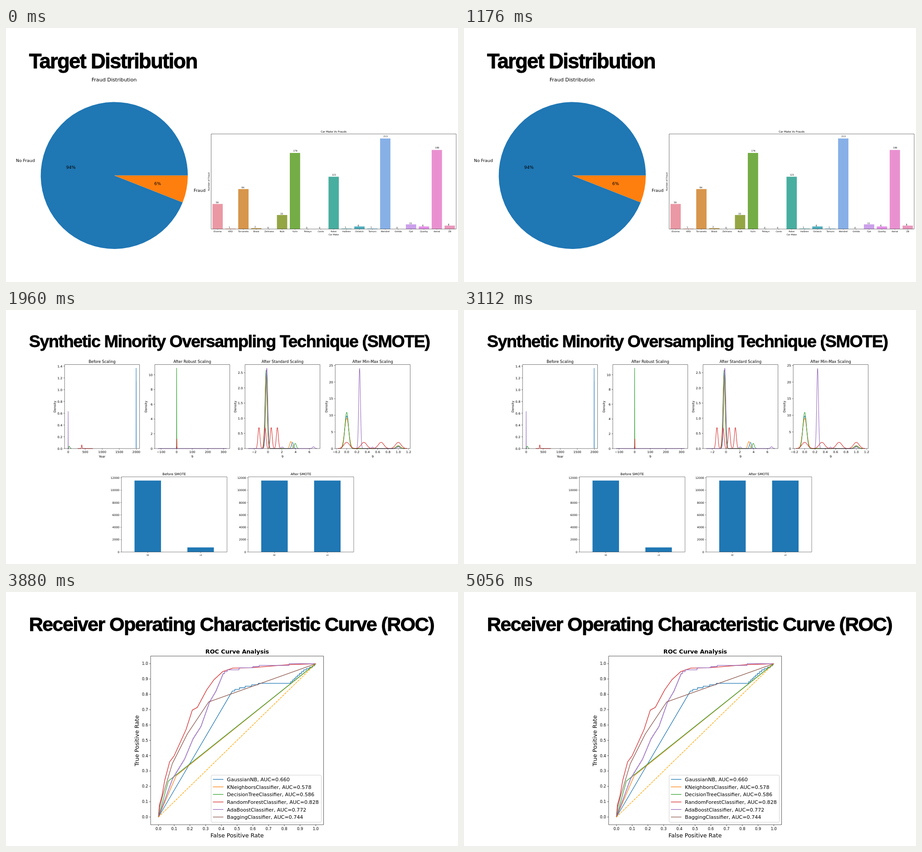
An HTML page with a canvas that plays this animation: 997x561 px, repeating every 5840 ms.

```html
<!DOCTYPE html>
<html lang="en">
<head>
<meta charset="utf-8">
<title>Fraud model slides</title>
<style>
html, body { margin: 0; width: 100%; height: 100%; overflow: hidden; background: #fff; }
canvas { display: block; }
</style>
</head>
<body>
<canvas id="stage" width="997" height="561"></canvas>
<script>
const ctx = document.getElementById('stage').getContext('2d');
const [BLUE, ORANGE, GREEN, RED, PURPLE, BROWN] =
  ['#1f77b4', '#ff7f0e', '#2ca02c', '#d62728', '#9467bd', '#8c564b'];

// y is the middle of the capitals
function text(str, x, y, size, { align = 'center', weight = '', turned = false } = {}) {
  ctx.save();
  ctx.translate(x, y);
  if (turned) ctx.rotate(-Math.PI / 2);
  ctx.font = `${weight} ${size}px "DejaVu Sans", sans-serif`;
  ctx.textAlign = align;
  ctx.fillStyle = '#000';
  ctx.fillText(str, 0, size * 0.365);
  ctx.restore();
}

function heading(str, size, baseline) {
  ctx.font = `bold ${size}px "Liberation Sans", Arial, sans-serif`;
  ctx.letterSpacing = `${-0.038 * size}px`;
  ctx.textAlign = 'left';
  ctx.fillStyle = ctx.strokeStyle = '#000';
  ctx.lineWidth = size * 0.02;
  ctx.lineJoin = 'round';
  ctx.fillText(str, 50.7, baseline);
  ctx.strokeText(str, 50.7, baseline);
  ctx.letterSpacing = '0px';
}

function line(points, color, width) {
  ctx.beginPath();
  for (const [x, y] of points) ctx.lineTo(x, y);
  ctx.strokeStyle = color;
  ctx.lineWidth = width;
  ctx.lineJoin = 'round';
  ctx.stroke();
}

function rect(x, y, w, h, color) {
  ctx.fillStyle = color;
  ctx.fillRect(x, y, w, h);
}

function frame([x0, y0, x1, y1], width) {
  ctx.strokeStyle = '#000';
  ctx.lineWidth = width;
  ctx.strokeRect(x0, y0, x1 - x0, y1 - y0);
}

const range = (from, step, count) => Array.from({ length: count }, (_, i) => from + i * step);
const label = (v, digits) => v.toFixed(digits).replace(/^-/, '\u2212');

function axes({ box, size, x, y, xTicks = [], yTicks, xDigits = 0, yDigits = 0 }) {
  const [left, , , bottom] = box, tick = size * 0.35, width = size * 0.08;
  frame(box, width);
  for (const v of xTicks) {
    line([[x(v), bottom], [x(v), bottom + tick]], '#000', width);
    text(label(v, xDigits), x(v), bottom + size * 1.12, size);
  }
  for (const v of yTicks) {
    line([[left - tick, y(v)], [left, y(v)]], '#000', width);
    text(label(v, yDigits), left - size * 0.7, y(v), size, { align: 'right' });
  }
}

// ---- Slide 1: class balance ----

function pie() {
  const cx = 238.8, cy = 325.7, r = 162.2, split = 0.0599 * 2 * Math.PI;
  const slices = [
    [split, 2 * Math.PI, BLUE, 'No Fraud', '94%', 'right'],
    [0, split, ORANGE, 'Fraud', '6%', 'left'],
  ];
  text('Fraud Distribution', 238.5, 113.5, 11.15);
  for (const [from, to, color, name, share, align] of slices) {
    const mid = (from + to) / 2;
    const at = d => [cx + r * d * Math.cos(mid), cy + r * d * Math.sin(mid)];
    ctx.beginPath();
    ctx.moveTo(cx, cy);
    ctx.arc(cx, cy, r, from, to);
    ctx.fillStyle = color;
    ctx.fill();
    text(name, ...at(1.1), 9.3, { align });
    text(share, ...at(0.6), 9.3);
  }
}

// Evenly bright hue in CIE LUV, at 90% of the largest chroma, then muted
function hueColor(turn) {
  const L = 70, angle = turn * 359 * Math.PI / 180, Y = ((L + 16) / 116) ** 3;
  const linear = chroma => {
    const u = chroma * Math.cos(angle) / (13 * L) + 0.19783;
    const v = chroma * Math.sin(angle) / (13 * L) + 0.46832;
    const X = Y * 9 * u / (4 * v), Z = Y * (12 - 3 * u - 20 * v) / (4 * v);
    return [
      3.2406 * X - 1.5372 * Y - 0.4986 * Z,
      -0.9689 * X + 1.8758 * Y + 0.0415 * Z,
      0.0557 * X - 0.204 * Y + 1.057 * Z,
    ];
  };
  let chroma = 0;
  while (linear(chroma).every(c => c >= 0 && c <= 1)) chroma += 0.5;
  const rgb = linear(chroma * 0.9).map(c => c <= 0.0031 ? 12.92 * c : 1.055 * c ** (1 / 2.4) - 0.055);
  const mid = (Math.max(...rgb) + Math.min(...rgb)) / 2;
  return `rgb(${rgb.map(c => Math.round(255 * (mid + (c - mid) * 0.75)))})`;
}

const frauds = {
  Elvoma: 59, KRD: 1, Torvanelo: 94, Brask: 2, Zelmano: 0, Nulk: 33, Yurin: 179,
  Pelwyn: 0, Cavto: 0, Rokei: 123, Halbren: 1, Ostwick: 6, Tamuro: 1, Wendrel: 213,
  Grelda: 0, Fjot: 11, Quorby: 6, Ikenai: 186, ZB: 8,
};

function makeChart() {
  const box = [452.5, 234, 993, 444], bars = Object.entries(frauds);
  const step = (box[2] - box[0]) / bars.length;
  bars.forEach(([name, count], i) => {
    const x = box[0] + step * (i + 0.5), h = count * 0.939;
    rect(x - step * 0.4, box[3] - h, step * 0.8, h, hueColor(i / bars.length + 0.01));
    text(count, x - 4, box[3] - h - 2.4 - count * 0.012, 4.8, { align: 'left' });
    text(name, x, 449.4, 4.75);
    line([[x, box[3]], [x, box[3] + 1.7]], '#000', 0.4);
  });
  frame(box, 0.55);
  text('Car Make Vs Frauds', 722.7, 229, 5.8);
  text('Car Make', 722.7, 456.2, 4.8);
  text('Number of Fraud', 447.7, 339.5, 4.8, { turned: true });
}

function balanceSlide() {
  heading('Target Distribution', 45.5, 89.3);
  pie();
  makeChart();
}

// ---- Slide 2: scaling and oversampling ----

// Each curve: [color, bandwidth, { centre: height }]
function densityPlot({ title, xLabel = '9', x0, xScale, yScale, curves, ...ticks }, i) {
  const left = 129.2 + i * 199, middle = left + 82.7;
  const x = v => x0 + v * xScale, y = v => 306 - v * yScale;
  for (const [color, sigma, peaks] of curves) {
    const bumps = Object.entries(peaks).map(([mu, h]) => [Number(mu), h]);
    const centres = bumps.map(([mu]) => mu);
    const from = Math.min(...centres) - 3.2 * sigma, to = Math.max(...centres) + 3.2 * sigma;
    const density = v => bumps.reduce(
      (sum, [mu, h]) => sum + h * Math.exp(-(((v - mu) / sigma) ** 2) / 2), 0);
    line(range(from, (to - from) / 800, 801).map(v => [x(v), y(density(v))]), color, 1.05);
  }
  axes({ box: [left, 120.5, left + 165.4, 306], size: 6.87, x, y, ...ticks });
  text(title, middle, 113.5, 8.25);
  text(xLabel, middle, 323.3, 6.87);
  text('Density', left - (ticks.yDigits ? 22.2 : 19.8), 213.5, 6.87, { turned: true });
}

const evenPeaks = (from, step, height) =>
  Object.fromEntries(range(from, step, 4).map(v => [v, height]));

const densityPlots = [
  {
    title: 'Before Scaling', xLabel: 'Year', x0: 137.1, xScale: 0.0752, yScale: 130,
    xTicks: range(0, 500, 5), yTicks: range(0, 0.2, 8), yDigits: 1,
    curves: [
      [BLUE, 0.4, { 1994: 1.365, 1996: 1.15 }],
      [GREEN, 13, { 30: 0.035, 50: 0.015 }],
      [RED, 9, { 310: 0, 400: 0.062, 695: 0 }],
      [PURPLE, 0.9, { 0: 0.63, 15: 0 }],
    ],
  },
  {
    title: 'After Robust Scaling', x0: 376.4, xScale: 0.3445, yScale: 16.3,
    xTicks: range(-100, 100, 5), yTicks: range(0, 2, 6),
    curves: [
      [PURPLE, 1, { '-116': 0, 0: 0.3, 317: 0 }],
      [GREEN, 0.4, { 0: 10.9 }],
      [RED, 0.5, { 1: 1.3 }],
    ],
  },
  {
    title: 'After Standard Scaling', x0: 578, xScale: 15.2, yScale: 67,
    xTicks: range(-2, 2, 5), yTicks: range(0, 0.5, 6), yDigits: 1,
    curves: [
      [BLUE, 0.15, { '-0.27': 2.58, 3.55: 0.2 }],
      [ORANGE, 0.16, { '-0.3': 2.4, 3.3: 0.23 }],
      [GREEN, 0.15, { '-0.26': 2.58, 3.95: 0.17 }],
      [RED, 0.143, evenPeaks(-1.32, 0.89, 0.69)],
      [PURPLE, 0.15, { '-2.4': 0, '-0.18': 2.65, 2.05: 0.05, 6.6: 0.06 }],
    ],
  },
  {
    title: 'After Min-Max Scaling', x0: 751.5, xScale: 113.8, yScale: 7.34,
    xTicks: range(-0.2, 0.2, 8), xDigits: 1, yTicks: range(0, 5, 6),
    curves: [
      [BLUE, 0.038, { 0: 9.8, 1: 0.7 }],
      [ORANGE, 0.041, { 0: 9.1, 1: 0.85 }],
      [GREEN, 0.035, { 0: 10.9, 1: 0.8 }],
      [RED, 0.054, evenPeaks(0, 1 / 3, 1.87)],
      [PURPLE, 0.017, { 0.25: 24.1, 0.5: 0.45, 1: 0.6 }],
    ],
  },
];

function classChart(title, left, counts) {
  const box = [left, 368.5, left + 233, 534.5], y = v => 534.5 - v * 0.01365;
  counts.forEach((count, i) => {
    const x = left + 58.2 + i * 116.6;
    rect(x - 29.2, y(count), 58.4, 534.5 - y(count), BLUE);
    line([[x, 534.5], [x, 536.7]], '#000', 0.5);
    text(i, x, 541.4, 6.1, { turned: true });
  });
  axes({ box, size: 6.15, y, yTicks: range(0, 2000, 7) });
  text(title, left + 116.5, 362.5, 7.3);
}

function smoteSlide() {
  heading('Synthetic Minority Oversampling Technique (SMOTE)', 37.7, 82);
  densityPlots.forEach(densityPlot);
  classChart('Before SMOTE', 254.5, [11560, 740]);
  classChart('After SMOTE', 534, [11560, 11560]);
}

// ---- Slide 3: ROC curves ----

// Turns a sloped path into small stairs centred on it
function stairs(points) {
  const out = [points[0]];
  points.slice(1).forEach(([x1, y1], i) => {
    const [x0, y0] = points[i];
    const n = Math.max(1, Math.round((y1 - y0) / 0.01));
    for (let k = 0; k < n; k++) {
      const x = x0 + (x1 - x0) * (k + 0.5) / n;
      out.push([x, y0 + (y1 - y0) * k / n], [x, y0 + (y1 - y0) * (k + 1) / n]);
    }
    out.push([x1, y1]);
  });
  return out;
}

// Key points between (0, 0) and (1, 1)
const rocCurves = [
  ['GaussianNB, AUC=0.660', BLUE, stairs([[0.47, 0.822], [0.53, 0.843], [0.655, 0.872],
    [0.835, 0.872], [0.89, 0.925], [0.93, 0.96], [0.99, 0.985]])],
  ['KNeighborsClassifier, AUC=0.578', ORANGE, [[0.113, 0.27]]],
  ['DecisionTreeClassifier, AUC=0.586', GREEN, [[0.063, 0.235]]],
  ['RandomForestClassifier, AUC=0.828', RED, [[0.006, 0.08], [0.022, 0.136], [0.04, 0.24],
    [0.071, 0.36], [0.1, 0.4], [0.175, 0.57], [0.215, 0.697], [0.247, 0.715], [0.307, 0.83],
    [0.354, 0.897], [0.408, 0.948], [0.472, 0.971], [0.587, 0.973], [0.82, 0.993]]],
  ['AdaBoostClassifier, AUC=0.772', PURPLE, stairs([[0, 0], [0.04, 0.11], [0.09, 0.25],
    [0.166, 0.378], [0.22, 0.51], [0.27, 0.59], [0.325, 0.75], [0.365, 0.82], [0.412, 0.936],
    [0.445, 0.96], [0.58, 0.973], [0.66, 0.989], [1, 1]])],
  ['BaggingClassifier, AUC=0.744', BROWN, [[0.008, 0.065], [0.026, 0.136], [0.088, 0.348],
    [0.184, 0.543], [0.319, 0.75]]],
];

function rocSlide() {
  const x = v => 336.3 + v * 347, y = v => 497 - v * 338.7;
  const plot = (points, color) =>
    line([[0, 0], ...points, [1, 1]].map(([a, b]) => [x(a), y(b)]), color, 1.3);

  heading('Receiver Operating Characteristic Curve (ROC)', 43.2, 86.3);
  text('ROC Curve Analysis', 510, 131.7, 12.75, { weight: 'bold' });
  for (const [, color, points] of rocCurves) plot(points, color);
  ctx.setLineDash([4.7, 2]);
  plot([], '#ffa500');
  ctx.setLineDash([]);

  const tenths = range(0, 0.1, 11);
  axes({
    box: [319, 141.5, 700.5, 514], size: 8.3, x, y,
    xTicks: tenths, yTicks: tenths, xDigits: 1, yDigits: 1,
  });
  text('False Positive Rate', 509.7, 537.7, 12.65);
  text('True Positive Rate', 288, 328.5, 12.65, { turned: true });

  ctx.beginPath();
  ctx.roundRect(452.5, 404.5, 243, 104, 2.5);
  ctx.fillStyle = 'rgba(255,255,255,.8)';
  ctx.fill();
  ctx.strokeStyle = '#ccc';
  ctx.lineWidth = 0.9;
  ctx.stroke();
  rocCurves.forEach(([name, color], i) => {
    const row = 413.8 + i * 16.65;
    line([[456.5, row], [479.5, row]], color, 1.3);
    text(name, 487.3, row + 0.2, 11.12, { align: 'left' });
  });
}

// ---- Loop ----

const slides = [[1960, balanceSlide], [3880, smoteSlide], [5840, rocSlide]];
let shown;

function tick() {
  const time = performance.now() % 5840;
  const draw = slides.find(([end]) => time < end)[1];
  if (draw !== shown) {
    rect(0, 0, 997, 561, '#fff');
    draw();
    shown = draw;
  }
  requestAnimationFrame(tick);
}
tick();
</script>
</body>
</html>
```
